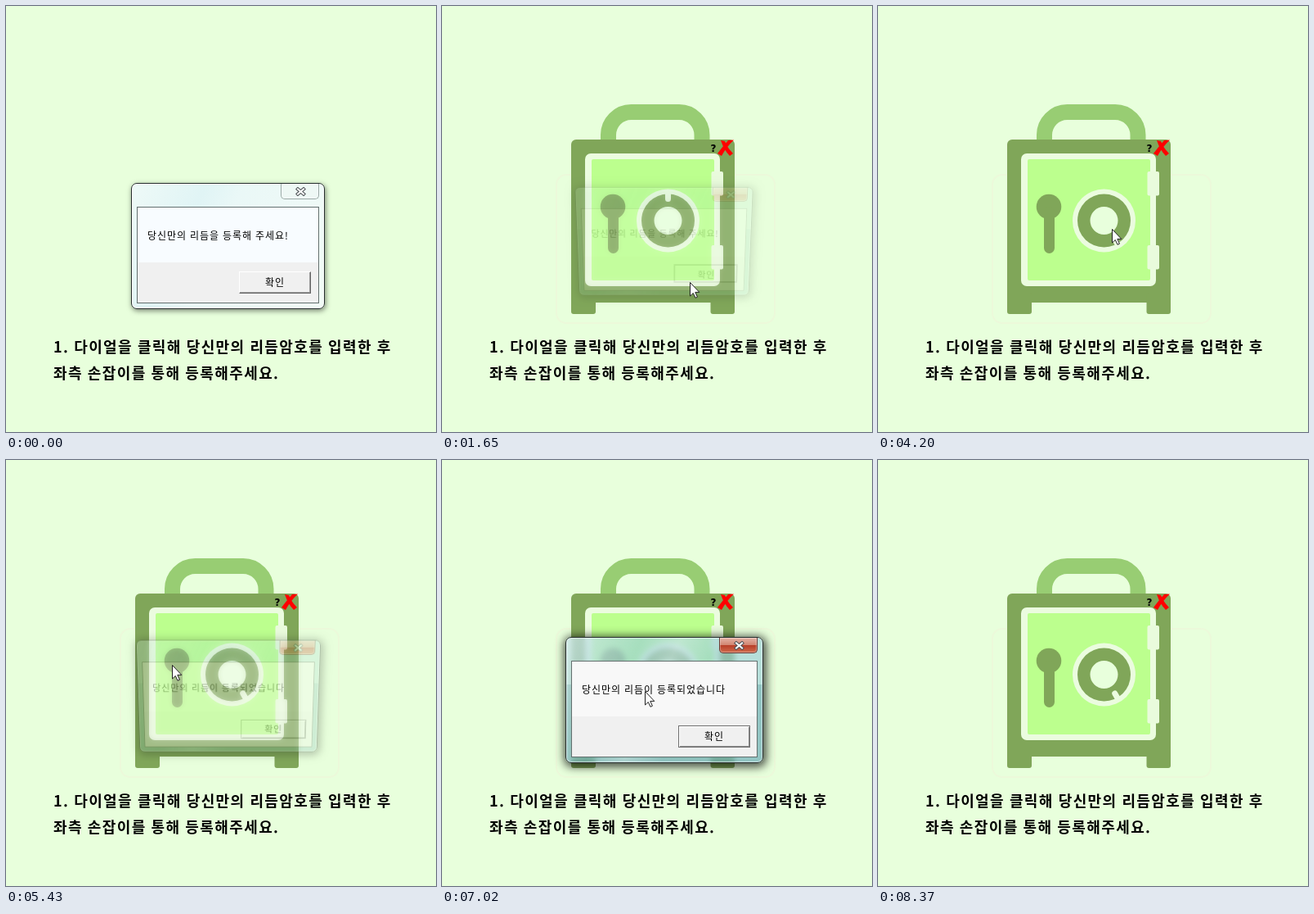
These frames come from a looping animation (526x520 px, 9330 ms). An HTML page:

```html
<!DOCTYPE html>
<html lang="ko">
<head>
<meta charset="utf-8">
<style>
html, body { margin: 0; width: 100%; height: 100%; overflow: hidden; background: #e8ffdc; }
body { font: 12px 'Noto Sans CJK KR', 'Noto Sans CJK', sans-serif; color: #000; }
svg, .dialog, .dialog * { position: absolute; box-sizing: border-box; }
.stage { left: 0; top: 0; }
.caption { font-size: 18px; font-weight: 700; letter-spacing: 1.4px; word-spacing: -.55px; }
.dialog {
  top: 216px; height: 154px; border: 1px solid #26302f; border-radius: 7px;
  background: linear-gradient(115deg, #fff6, #fff0 30%, #fff4 45%, #fff0 60%),
    linear-gradient(rgba(155, 205, 216, .65) 57px, rgba(110, 172, 184, .7) 57px);
  box-shadow: inset 0 0 0 1px #fff8, 1px 2px 11px 3px rgba(0, 0, 0, .68);
  backdrop-filter: blur(3px); letter-spacing: .95px; word-spacing: -.3px; white-space: nowrap;
}
.client {
  left: 6px; right: 6px; top: 28px; bottom: 6px; border: 1px solid #64706f;
  background: linear-gradient(var(--paper) 67px, #f0f0f0 67px);
}
.message { left: 12px; top: 25px; line-height: 18px; }
.button {
  right: var(--gap); top: 78px; width: 88px; height: 27px; line-height: 24px; text-align: center;
  background: #f0f0f0; border: 1px solid; border-color: #fff #606060 #606060 #fff;
  box-shadow: inset -1px -1px #a0a0a0;
}
.focus .button { border-color: #707070; box-shadow: inset 1px 1px #fff, inset -1px -1px #888; }
.pressed .button { border: 2px solid #7b7b7b; box-shadow: none; padding: 1px 0 0 2px; line-height: 23px; }
.close {
  right: 6px; top: 0; width: 47px; height: 19px; border: 1px solid #6b3a34; border-top: 0;
  border-radius: 0 0 5px 5px; box-shadow: inset 0 0 0 1px #fff5;
  background: linear-gradient(#e4b3a6, #d28672 48%, #b83f28 52%, #cf6a4c);
}
.close svg { left: 17px; top: 4px; stroke-linecap: square; }
.idle { background: linear-gradient(115deg, #eefaf7, #e0f4f5 30%, #eaf8f7 45%, #f1faf6); box-shadow: inset 0 0 0 1px #fff, 1px 2px 6px rgba(0, 0, 0, .5); }
.idle .close { background: #eef8f5; border-color: #9aa9a6; }
</style>
</head>
<body>
<svg class="stage" width="526" height="520">
  <g class="caption">
    <text x="58" y="423">1. 다이얼을 클릭해 당신만의 리듬암호를 입력한 후</text>
    <text x="58" y="455">좌측 손잡이를 통해 등록해주세요.</text>
  </g>
  <g id="scene">
    <rect x="140" y="206" width="267" height="181" rx="12" fill="none" stroke="#f0f0d8" stroke-width="2" opacity=".4"/>
    <g id="safe">
      <path d="M203.5 166V158a28 28 0 0 1 28-28.5H290a28 28 0 0 1 28 28.5V166" fill="none" stroke="#98cd73" stroke-width="19"/>
      <g fill="#80a659">
        <rect x="158" y="163" width="200" height="199" rx="6"/>
        <rect x="158" y="350" width="30" height="26" rx="3"/>
        <rect x="328.5" y="350" width="29.5" height="26" rx="3"/>
      </g>
      <rect x="175" y="180" width="165" height="162" rx="7" fill="#ebfcdf"/>
      <rect x="183" y="187" width="150" height="148" rx="2" fill="#bcff8e"/>
      <g fill="#e9fbdc">
        <rect x="329.5" y="202" width="14.5" height="29.5" rx="2"/>
        <rect x="329.5" y="292" width="14.5" height="29.5" rx="2"/>
      </g>
      <g fill="#80a659">
        <circle cx="209" cy="245" r="15.3"/>
        <rect x="203" y="245" width="13" height="57" rx="6.5"/>
      </g>
      <g transform="translate(276.5 262)">
        <circle r="38.5" fill="#ebfcdf"/>
        <circle r="32.5" fill="#80a659"/>
        <circle r="17" fill="#e8ffdc"/>
        <path id="mark" d="M0-34V-26.5" stroke="#ebfcdf" stroke-width="7" stroke-linecap="round"/>
      </g>
      <text x="328.5" y="178" font-family="DejaVu Sans, sans-serif" font-weight="700" font-size="12">?</text>
      <path d="M337 180Q343 172 350 164L357 163.5Q348 172 342 183ZM341 164L346 165Q349 173 356 180L352 183Q345 176 341 164Z" fill="#f00"/>
    </g>
  </g>
</svg>
<svg class="stage" width="526" height="520" style="z-index:2">
  <path id="cursor" d="M.5.5V17L4.3 13.5 7 19.3 9.4 18.2 6.8 12.4H11.8Z" fill="#fff" stroke="#222"/>
</svg>
<script>
const LOOP = 9330, STEP = 30;
const $ = id => document.getElementById(id);
const clamp = v => Math.min(1, Math.max(0, v));
const ramp = (t, from, to) => clamp((t - from) / (to - from));
const smooth = p => p * p * (3 - 2 * p);

function makeDialog(left, width, gap, paper, message) {
  const el = document.createElement('div');
  el.style.cssText = `left:${left}px;width:${width}px;--gap:${gap}px;--paper:${paper}`;
  const cross = 'M3 2.5L10 8.5M10 2.5L3 8.5';
  el.innerHTML = `<div class="client"><div class="message">${message}</div><div class="button">확인</div></div>
    <div class="close"><svg width="13" height="11"><path d="${cross}" stroke="#4b5054" stroke-width="4.2"/>
    <path d="${cross}" stroke="#fff" stroke-width="2.2"/></svg></div>`;
  document.body.append(el);
  return el;
}

// k is 1 when fully open; the window shrinks and tilts as it fades
function showDialog(el, k, state) {
  const out = 1 - k;
  el.className = 'dialog ' + state;
  el.style.display = k > 0 ? 'block' : 'none';
  el.style.opacity = k;
  el.style.transform = out
    ? `translateY(${-5 * out}px) perspective(800px) rotateX(${-20 * out}deg) scale(${1 - .12 * out})` : 'none';
}

const ask = makeDialog(153, 237, 9, '#f8fcff', '당신만의 리듬을 등록해 주세요!');
const done = makeDialog(151, 242, 8, '#f8f8f8', '당신만의 리듬이 등록되었습니다');

const clicks = [2940, 3030, 3120, 3210, 3600, 3810, 4200];
const shakes = [2040, 4680];
// start, end, x, y of each cursor move
const moves = [
  [810, 990, 299, 321], [1170, 1290, 303, 337], [1830, 2040, 286, 272],
  [4470, 4680, 203, 250], [6810, 7320, 326, 338], [8250, 8370, 474, 321]
];

function cursorAt(t) {
  let x = 468, y = 411;
  for (const [from, to, nx, ny] of moves) {
    const p = smooth(ramp(t, from, to));
    x += (nx - x) * p;
    y += (ny - y) * p;
  }
  return `translate(${Math.round(x)} ${Math.round(y)})`;
}

function shakeAt(t) {
  const start = shakes.find(s => t >= s && t < s + 270);
  return start ? -1.55 * Math.sin((t - start) * Math.PI / 90) : 0;
}

function draw(now) {
  const t = Math.floor(now % LOOP / STEP) * STEP;
  $('scene').style.display = t >= 1500 ? '' : 'none';
  $('safe').setAttribute('transform', `rotate(${shakeAt(t)} 258 269)`);
  $('mark').setAttribute('transform', `rotate(${-30 * clicks.filter(c => t >= c).length})`);

  showDialog(ask, 1 - smooth(ramp(t, 1470, 1710)), t < 1470 ? 'idle' : 'pressed');
  const opening = t < 5430 ? 0 : .3 + .7 * ramp(t, 5430, 5670);
  showDialog(done, opening * (1 - smooth(ramp(t, 7650, 7800))), 'focus');

  $('cursor').style.display = t >= 810 && t < 8370 ? '' : 'none';
  $('cursor').setAttribute('transform', cursorAt(t));
}

const begin = performance.now();
function tick() {
  draw(performance.now() - begin);
  requestAnimationFrame(tick);
}
tick();
</script>
</body>
</html>
```
